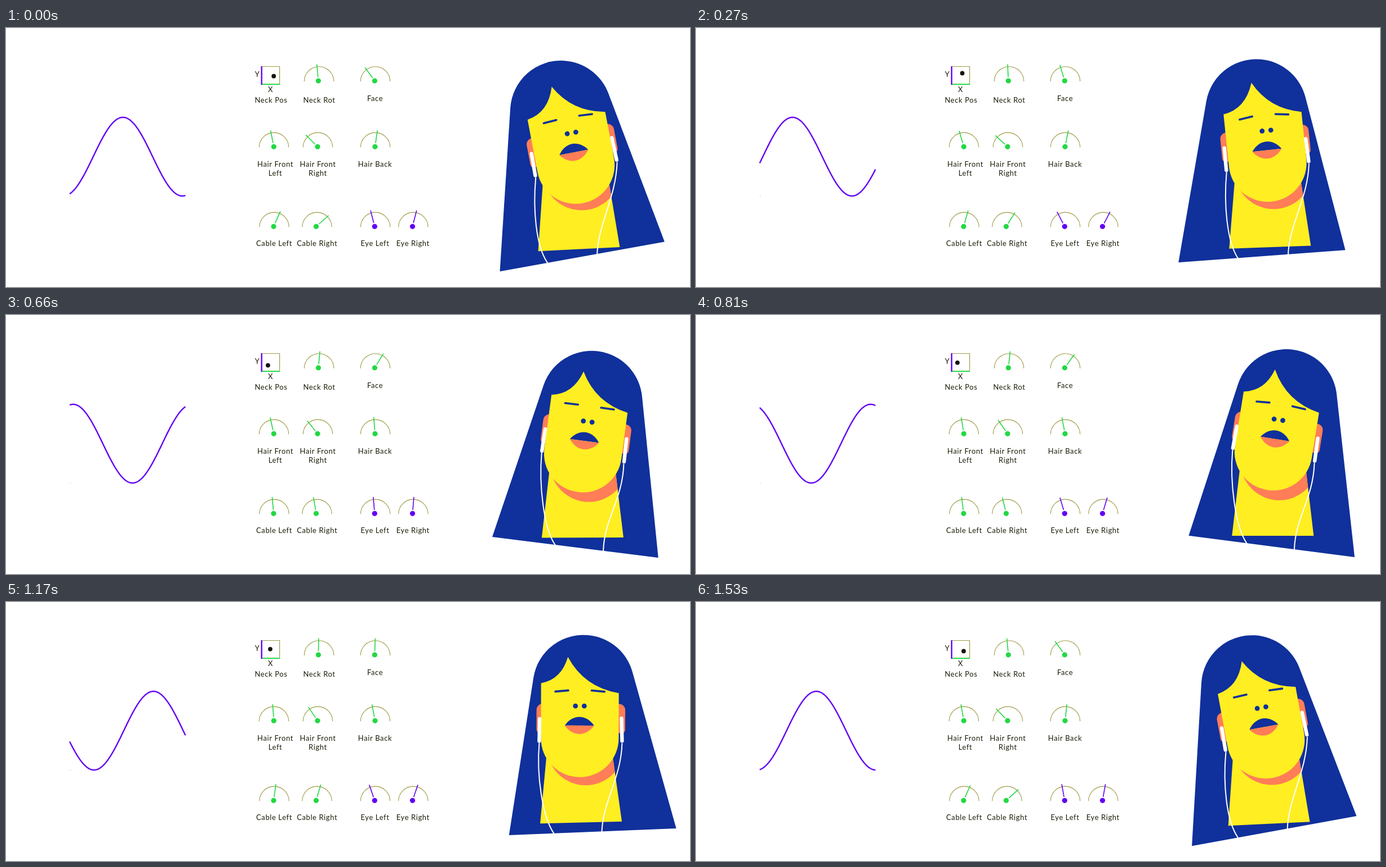
These frames come from a looping animation (1214 by 461 pixels, 1.56 s). An HTML page with a canvas:

```html
<!DOCTYPE html>
<html lang="en">
<head>
<meta charset="utf-8">
<title>Head rig driven by one sine wave</title>
<style>
  html, body { margin: 0; width: 100%; height: 100%; overflow: hidden; background: #fff; }
  canvas { display: block; }
</style>
</head>
<body>
<canvas id="stage" width="1214" height="461"></canvas>
<script>
const ctx = document.getElementById('stage').getContext('2d');
// The loop restarts just before the swing has come full circle.
const LOOP = 1560, PERIOD = 1575, STEP = 30, TAU = Math.PI * 2, DEG = Math.PI / 180;
const BLUE = '#10309b', YELLOW = '#ffee22', CORAL = '#ff7d57', WHITE = '#fff';
const PURPLE = '#6200f5', GREEN = '#22d843', OLIVE = '#a09a45', INK = '#1c1c08';

let theta = 0;
// One swing per period, and the bob that runs twice as fast.
const swing = (mid, size, phase = 0) => mid + size * Math.cos(theta - phase * DEG);
const bob = size => size * Math.cos(2 * theta - 278 * DEG);

function line(color, width, ...points) {
  ctx.beginPath();
  points.forEach(([x, y]) => ctx.lineTo(x, y));
  ctx.strokeStyle = color;
  ctx.lineWidth = width;
  ctx.stroke();
}

function dot(x, y, r, color) {
  ctx.beginPath();
  ctx.arc(x, y, r, 0, TAU);
  fill(color);
}

function fill(color) {
  ctx.fillStyle = color;
  ctx.fill();
}

function label(text, x, y) {
  ctx.fillStyle = INK;
  ctx.fillText(text, x, y);
}

function drawWave() {
  const peak = 207.5 - 211 * theta / TAU;
  ctx.lineCap = 'butt';
  ctx.lineJoin = 'round';
  ctx.beginPath();
  for (let x = 113; x <= 318.5; x += 0.5) {
    ctx.lineTo(x, 229 - 70 * Math.cos(TAU * (x - peak) / 211));
  }
  ctx.strokeStyle = PURPLE;
  ctx.lineWidth = 2.4;
  ctx.stroke();
  ctx.fillStyle = '#d8cf9a';
  ctx.fillRect(113, 299, 2, 1);
}

function drawDial(x, y, arcX, degrees, color) {
  const a = degrees * DEG, s = Math.sin(a), c = -Math.cos(a);
  ctx.beginPath();
  ctx.arc(arcX, y + 1, 26.2, Math.PI, TAU);
  ctx.strokeStyle = OLIVE;
  ctx.lineWidth = 1.1;
  ctx.stroke();
  line(color, 1.6, [x + 6.5 * s, y + 6.5 * c], [x + 29.5 * s, y + 29.5 * c]);
  dot(x, y, 4.6, color);
}

function drawPanel() {
  ctx.lineCap = 'butt';
  ctx.lineJoin = 'miter';
  line(OLIVE, 1.2, [454, 68.5], [485.6, 68.5], [485.6, 100]);
  line(GREEN, 2, [453, 100.2], [486, 100.2]);
  line(PURPLE, 2.4, [453.7, 68], [453.7, 101]);
  dot(swing(469.6, 5.6, 4), 85 + bob(5), 3.9, '#15150c');

  const eye = 16 - bob(12.3);
  drawDial(554.4, 94, 555.6, swing(0.5, -5.8, 3), GREEN);
  drawDial(654.4, 94, 655.5, swing(0, -36), GREEN);
  drawDial(475.3, 211.3, 475.5, swing(-10.3, -6.5, 83), GREEN);
  drawDial(553, 211.3, 553.5, swing(-40, -7.5, 50), GREEN);
  drawDial(655, 211.3, 655.5, swing(-1, 13, 45), GREEN);
  drawDial(475, 353.3, 476, swing(8.5, 15.5), GREEN);
  drawDial(550.5, 353.3, 552, swing(17.5, 31), GREEN);
  drawDial(654.3, 353.3, 655.5, -eye, PURPLE);
  drawDial(721.5, 353.3, 722.8, eye, PURPLE);

  ctx.font = '13px Lato, sans-serif';
  ctx.letterSpacing = '0.6px';
  ctx.textAlign = 'center';
  label('Y', 446, 86.5);
  label('X', 469.5, 114);
  label('Neck Pos', 470.5, 132.5);
  label('Neck Rot', 556, 132.5);
  label('Face', 655, 129.5);
  label('Hair Front', 478, 246.7);
  label('Left', 478, 262.7);
  label('Hair Front', 553.5, 246.7);
  label('Right', 553.5, 262.7);
  label('Hair Back', 655, 246.7);
  label('Cable Left', 476, 388.2);
  label('Cable Right', 552.2, 388.2);
  label('Eye Left', 655, 388.2);
  label('Eye Right', 722.3, 388.2);
}

// A round crown joined by tangents to the two corners of a swinging hem.
function drawHairBack() {
  const r = 90, x = swing(1016, -32, 14), y = swing(149.3, -1.7) + bob(3.3);
  const hemX = swing(1021.3, 20, 274), hemY = swing(409.3, -2.7) + bob(2);
  const tilt = swing(-1.3, -9, -9) * DEG;
  const corner = half => [hemX + half * Math.cos(tilt), hemY + half * Math.sin(tilt)];
  const tangent = ([px, py], side) =>
    Math.atan2(py - y, px - x) + side * Math.acos(r / Math.hypot(px - x, py - y));
  const left = corner(-148.5), right = corner(148.5);
  ctx.beginPath();
  ctx.moveTo(...left);
  ctx.arc(x, y, r, tangent(left, 1), tangent(right, -1));
  ctx.lineTo(...right);
  fill(BLUE);
}

function drawNeck(head) {
  ctx.save();
  ctx.translate(swing(1020.4, -3.4), 393.2 + bob(3.3));
  ctx.rotate(swing(-1.4, -1.4) * DEG);
  ctx.beginPath();
  ctx.moveTo(-72.5, 0);
  ctx.lineTo(-57.5, -128);
  ctx.lineTo(57.5, -128);
  ctx.lineTo(72.5, 0);
  ctx.closePath();
  fill(YELLOW);
  ctx.clip();
  ctx.setTransform(1, 0, 0, 1, 0, 0);
  dot(head.x + 10.5, head.y + swing(14.4, -3), 69, CORAL);
  ctx.restore();
}

function drawBrow(x, degrees) {
  const a = degrees * DEG, dx = 11.5 * Math.cos(a), dy = 11.5 * Math.sin(a);
  const y = -84.4 - bob(0.8);
  line(BLUE, 3.6, [x - dx, y - dy], [x + dx, y + dy]);
}

function drawLip(x, height, color) {
  ctx.beginPath();
  ctx.moveTo(x - 26, -22.8);
  ctx.bezierCurveTo(x - 12, -22.8 + height, x + 12, -22.8 + height, x + 26, -22.8);
  fill(color);
}

function drawHead(head) {
  const { ears, slide } = head;
  ctx.save();
  ctx.translate(head.x, head.y);
  ctx.rotate(head.tilt);

  ctx.beginPath();
  ctx.roundRect(ears - 79, -61.5, 30, 52, [11, 0, 0, 6]);
  ctx.roundRect(ears + 48.5, -61.5, 30, 52, [0, 11, 6, 0]);
  fill(CORAL);

  const sway = swing(0, 2, 60);
  ctx.beginPath();
  ctx.moveTo(-69, sway - 96.3);
  ctx.quadraticCurveTo(-31 + sway, -102.5 + 1.5 * sway, -18 + 2 * sway, -145);
  ctx.quadraticCurveTo(10 + 1.5 * sway, -93 - sway, 69, -82.5 - sway);
  ctx.lineTo(69, 0);
  ctx.arc(0, 0, 69, 0, Math.PI);
  fill(YELLOW);

  const brow = 4.2 - bob(3.7);
  ctx.lineCap = 'round';
  drawBrow(-31.3 + slide / 2, -brow);
  drawBrow(33 + slide / 2, brow);
  dot(-6.2 + slide, -57.6, 4.4, BLUE);
  dot(9.4 + slide, -57.6, 4.4, BLUE);
  drawLip(slide / 2, -20.5, BLUE);
  drawLip(slide / 2, 20, CORAL);

  line(WHITE, 6.4, [ears - 73.4, -34.5], [ears - 74, 5]);
  line(WHITE, 6.4, [ears + 72, -36], [ears + 73, 4.5]);
  ctx.restore();
}

function drawCable(head, side, [endX, endY], [ax, ay], [bx, by]) {
  const c = Math.cos(head.tilt), s = Math.sin(head.tilt), ear = side + head.ears;
  const x = head.x + ear * c - 9 * s, y = head.y + ear * s + 9 * c;
  ctx.beginPath();
  ctx.moveTo(x, y);
  ctx.bezierCurveTo(x + ax, y + ay, endX + bx, endY + by, endX, endY);
  ctx.lineTo(endX - bx / 5, endY - by / 5);
  ctx.strokeStyle = WHITE;
  ctx.lineWidth = 2;
  ctx.stroke();
}

function drawPortrait() {
  // Features slide across the face while the ears shift the other way.
  const slide = swing(0, 2.3, 45);
  const head = {
    x: swing(1018, -6.8, 1),
    y: 243.5 + bob(3.5),
    tilt: swing(-0.8, -9.9, 3) * DEG,
    slide,
    ears: 1 - 0.6 * slide
  };
  drawHairBack();
  drawNeck(head);
  drawHead(head);
  ctx.lineCap = 'round';
  drawCable(head, -74, [swing(968.5, -8.7, 20), swing(411, 5.5, -10) + bob(3)], [-5, 56], [-20, -30]);
  drawCable(head, 73, [swing(1055.5, -6.6, 15), swing(409.5, -6.5) + bob(3)], [-2, 62], [2, -55]);
}

function render() {
  const time = Math.floor(performance.now() % LOOP / STEP) * STEP;
  theta = TAU * time / PERIOD;
  ctx.fillStyle = WHITE;
  ctx.fillRect(0, 0, 1214, 461);
  drawWave();
  drawPanel();
  drawPortrait();
  requestAnimationFrame(render);
}
render();
</script>
</body>
</html>
```
